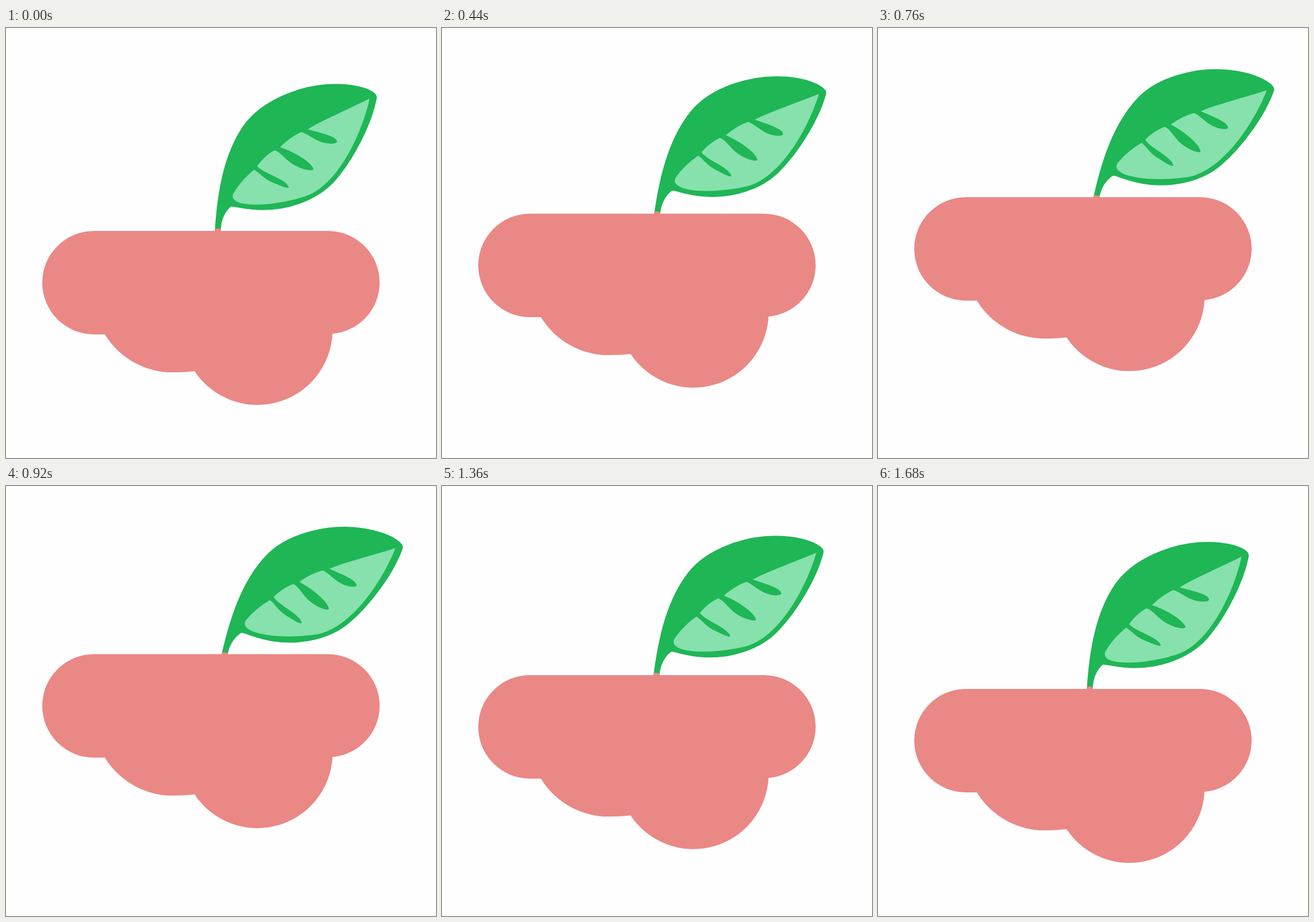
Write an HTML page that moves like this. It is 748 px wide and 748 px high and loops after 1720 ms.

```html
<!DOCTYPE html>
<html lang="en">
<head>
<meta charset="utf-8">
<title>Floating cloud with leaf</title>
<style>
  html, body { margin: 0; height: 100%; overflow: hidden; background: #fefefe; }
  svg { display: block; width: 100vw; height: 100vh; }
  .coral { fill: #ea8886; }
  .green { fill: #1fb656; }
  .light { fill: #86e1ac; }
  .edge { stroke: #1fb656; stroke-width: 1.4; }
</style>
</head>
<body>
<svg viewBox="0 0 748 748">
  <g id="plant">
    <g id="leaf">
      <path class="green edge" d="M364 352C368 290 378 222 413 171C443 128 510 98 574 98C605 98 632 105 642 115Q645 118 644 123C636 165 607 224 574 263C546 296 497 316 447 316C415 316 398 309 391 310C381 318 373 334 373 352Z"/>
      <path class="light" d="M632 123C590 144 545 163 524 177L514 181Q495 189 477 207L468 212Q450 222 437 240L431 247Q410 264 396 287C391 297 399 302 410 305C440 311 485 304 520 293C575 275 617 190 632 125Z"/>
      <path class="green" d="M510 180L524 176C540 181 574 187 576 197C576 203 556 202 545 197C533 192 524 184 514 181Z
        M466 211L476 207C500 215 530 232 535 245C535 251 510 245 496 235C484 226 477 216 468 213Z
        M429 246L436 239C446 253 487 262 492 277C491 281 472 272 460 267C446 260 440 251 432 247Z"/>
      <path class="coral" d="M363 349H373V358H363Z"/>
    </g>
    <path class="coral" d="M153 353H560A90 90 0 0 1 650 443A90 90 0 0 1 568 532A131 131 0 0 1 328 597Q311 599 293 599A138 138 0 0 1 172 533H153A90 90 0 0 1 153 353Z"/>
  </g>
</svg>
<script>
  const LOOP = 1720, STEP = 40;
  const plant = document.getElementById('plant');
  const leaf = document.getElementById('leaf');

  // [time in ms, height above rest]
  const keys = [[0, 0], [440, 30], [600, 49], [860, 61], [920, 60.5],
                [1120, 48.5], [1200, 39.5], [1360, 24], [1680, 0], [LOOP, 0]];

  function slope(i) {
    if (i === 0 || i === keys.length - 1) return 0;
    const [t0, y0] = keys[i - 1], [t, y] = keys[i], [t1, y1] = keys[i + 1];
    // Flat at the top and bottom of the float
    return (y - y0) * (y1 - y) > 0 ? (y1 - y0) / (t1 - t0) : 0;
  }

  // Cubic Hermite interpolation between the keys
  function heightAt(t) {
    const i = keys.findIndex((key, k) => k && t <= key[0]) - 1;
    const [t0, y0] = keys[i], [t1, y1] = keys[i + 1];
    const d = t1 - t0, u = (t - t0) / d, v = 1 - u;
    return v * v * (1 + 2 * u) * y0 + u * u * (1 + 2 * v) * y1
         + u * v * d * (v * slope(i) - u * slope(i + 1));
  }

  function draw() {
    const t = Math.floor(performance.now() % LOOP / STEP) * STEP;
    const height = heightAt(t);
    plant.setAttribute('transform', `translate(0 ${-height})`);
    leaf.setAttribute('transform', `rotate(${height * 0.151} 368 427)`);
    requestAnimationFrame(draw);
  }
  draw();
</script>
</body>
</html>
```
